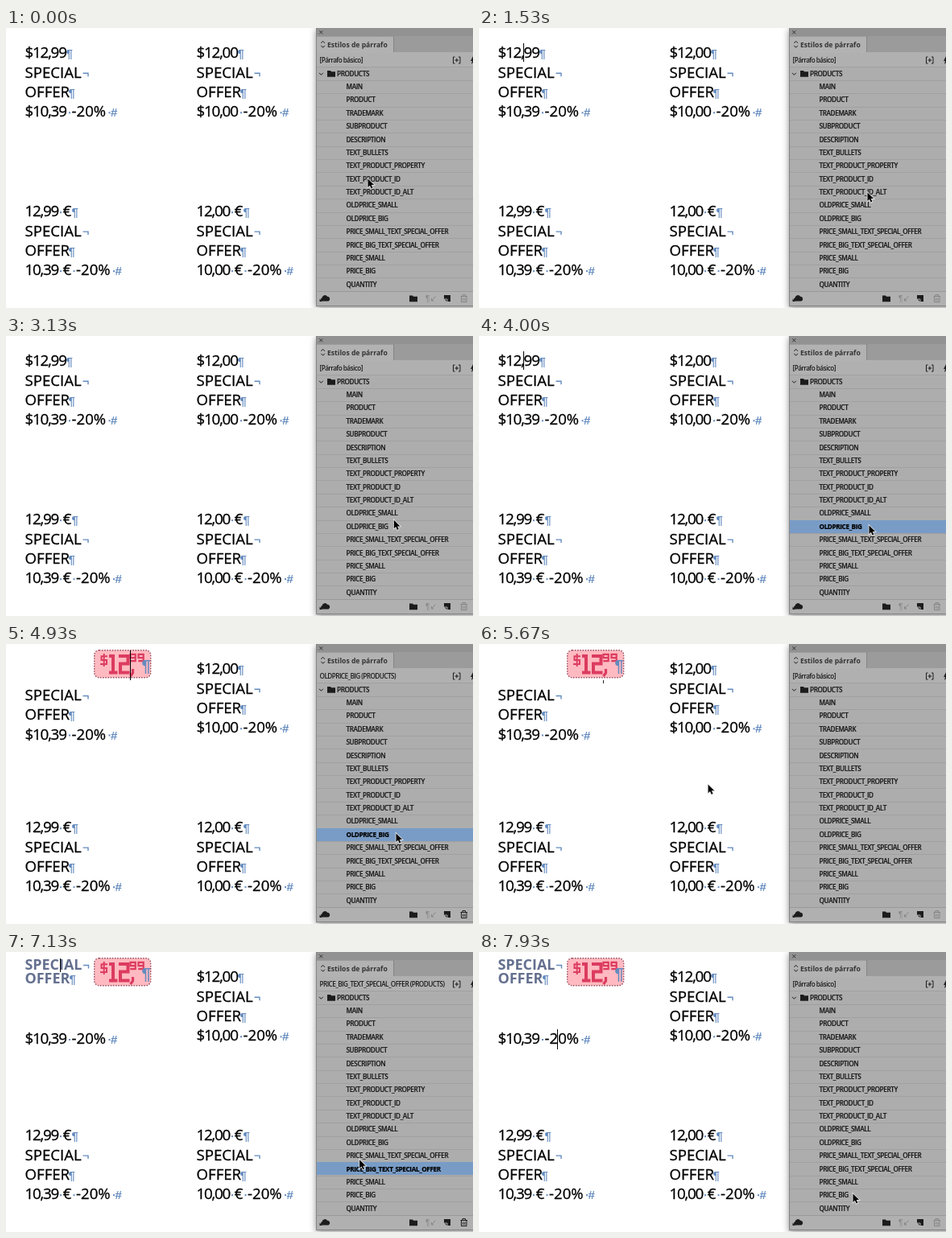
Write an HTML page with a canvas that moves like this. It is 580 px wide and 348 px high and loops after 8 s.

```html
<!DOCTYPE html>
<html lang="es">
<head>
<meta charset="utf-8">
<title>Estilos de párrafo</title>
<style>
html, body { margin: 0; width: 100%; height: 100%; overflow: hidden; background: #fff; }
canvas { display: block; }
</style>
</head>
<body>
<canvas id="stage" width="580" height="348"></canvas>
<script>
const ctx = document.getElementById('stage').getContext('2d');
const LOOP = 8000;
const SANS = '"Open Sans", "Noto Sans", sans-serif';
const MARK_FONT = '"Liberation Sans", Arial, sans-serif';
const MARK = '#648bbf', RED = '#dc3c60', INK = '#1c1c1c', DIM = '#858585';
const STYLES = ['MAIN', 'PRODUCT', 'TRADEMARK', 'SUBPRODUCT', 'DESCRIPTION', 'TEXT_BULLETS',
  'TEXT_PRODUCT_PROPERTY', 'TEXT_PRODUCT_ID', 'TEXT_PRODUCT_ID_ALT', 'OLDPRICE_SMALL',
  'OLDPRICE_BIG', 'PRICE_SMALL_TEXT_SPECIAL_OFFER', 'PRICE_BIG_TEXT_SPECIAL_OFFER',
  'PRICE_SMALL', 'PRICE_BIG', 'QUANTITY'];
const ROW_TOP = 64.8, ROW_H = 16.37;

// Times of the user's actions
const PRICE = { press: 3900, panel: 4080, apply: 4100, leave: 5350 };
const OFFER = { press: 6720, panel: 6860, apply: 7030, leave: 7700 };
const CLICK_OFFER = 5270, CLICK_LAST = 7450;

const POINTER = [ // time, x, y
  [0, 449, 187], [350, 449, 187], [1100, 478, 202], [1530, 482, 204], [2270, 478, 220],
  [2900, 480, 225], [3500, 484, 235], [4950, 484, 235], [5200, 67, 66], [5350, 67, 66],
  [5950, 460, 262], [6270, 467, 273], [7080, 467, 270], [7380, 98, 110], [7500, 98, 110],
  [7840, 458, 294], [7930, 464, 300], [8000, 464, 300]];

const within = (t, a, b) => t >= a && t < b;

// "bolder" outlines the glyphs slightly for weights between the installed ones
function text(str, x, y, size, { weight = 400, color = '#000', spacing = 0, family = SANS, bolder = 0 } = {}) {
  ctx.font = `${weight} ${size}px ${family}`;
  ctx.letterSpacing = spacing + 'px';
  ctx.fillStyle = color;
  ctx.fillText(str, x, y);
  if (!bolder) return;
  ctx.strokeStyle = color;
  ctx.lineWidth = bolder;
  ctx.lineJoin = 'round';
  ctx.strokeText(str, x, y);
  ctx.lineJoin = 'miter';
}

function box(x, y, w, h, color) {
  ctx.fillStyle = color;
  ctx.fillRect(x, y, w, h);
}

function stroke(d, color, width = 1) {
  ctx.strokeStyle = color;
  ctx.lineWidth = width;
  ctx.stroke(new Path2D(d));
}

function shape(d, color) {
  ctx.fillStyle = color;
  ctx.fill(new Path2D(d));
}

const word = (str, x, y) => text(str, x - .4, y, 18.6, { bolder: .3 });
const digits = (str, x, y) => text(str, x - .6, y, 18.8, { spacing: -1.15, bolder: .3 });
const mark = (str, x, y, size = 15) => text(str, x, y, size, { weight: 700, color: MARK, family: MARK_FONT });
const dot = (x, y) => box(x - 1, y - 6, 2, 2, MARK);
const lineBreak = (x, y) => stroke(`M${x} ${y - 5.5}h6.5v4`, MARK, 1.4);

function specialOffer(x, y1, y2) {
  word('SPECIAL', x, y1);
  lineBreak(x + 71.5, y1);
  word('OFFER', x, y2);
  mark('¶', x + 53.5, y2);
}

function discount(price, x, y, euro) {
  const shift = euro ? 5.5 : 0;
  digits(price, x, y);
  if (euro) {
    dot(x + 44, y);
    word('€', x + 47, y);
  }
  dot(x + 55 + shift, y);
  word('-20%', x + 58 + shift, y);
  dot(x + 104.5 + shift, y);
  mark('#', x + 106 + shift, y);
}

function priceLine(price, x, y, euro) {
  digits(price, x, y);
  if (euro) {
    dot(x + 44, y);
    word('€', x + 47, y);
  }
  mark('¶', x + (euro ? 57.5 : 50.5), y);
}

function product(x, y, price, reduced, euro) {
  priceLine(price, x, y, euro);
  specialOffer(x, y + 24.4, y + 48.6);
  discount(reduced, x, y + 73, euro);
}

function priceTag() {
  ctx.beginPath();
  ctx.roundRect(109.7, 7.7, 70, 34, 6);
  ctx.fillStyle = '#ffbac1';
  ctx.fill();
  ctx.strokeStyle = '#9c5062';
  ctx.lineWidth = 1.4;
  ctx.setLineDash([1.6, 1.6]);
  ctx.stroke();
  ctx.setLineDash([]);
  // Square-cut numerals: $ 1 2 , 99
  stroke('M126 15.2h-7.5v4.8h6.5v5h-8M121.7 12v16', RED, 2);
  stroke('M128 15h5v21M128 35.5h10.5', RED, 4);
  stroke('M140 15h11.5v9.5h-9.5v11h11.5', RED, 4);
  stroke('M157.5 31v5l-3 4', RED, 3.2);
  const nine = x => stroke(`M${x + 7} 17.2h-6v-4.4h6.2v8.4h-6.4`, RED, 2.2);
  nine(153.5);
  nine(163.5);
  mark('¶', 168.5, 34, 20);
}

function drawDocument(t) {
  const priced = t >= PRICE.apply, offered = t >= OFFER.apply;
  product(237, 37.3, '$12,00', '$10,00', false);
  product(24, 234.2, '12,99', '10,39', true);
  product(237, 234.2, '12,00', '10,00', true);
  if (!priced) return product(24, 37.3, '$12,99', '$10,39', false);

  priceTag();
  if (offered) {
    const slate = { weight: 700, color: '#64708f' };
    text('SPECIAL', 23.5, 22.3, 17.9, slate);
    lineBreak(96, 22);
    text('OFFER', 23.5, 39.3, 17.9, slate);
    mark('¶', 78.5, 39);
  } else {
    specialOffer(24, 70, 94.2);
  }
  discount('$10,39', 24, offered ? 114 : 118.5, false);
  if (within(t, CLICK_OFFER, OFFER.apply)) box(154, 45, 1, 4, '#222');
}

function drawCaret(t) {
  if (!within(t % 1060, 400, 930)) return;
  const [x, top, bottom] =
    t < PRICE.apply ? [55, 19, 42] :
    t < CLICK_OFFER ? [154, 8, 45] :
    t < OFFER.apply ? [67, 54, 76] :
    t < CLICK_LAST ? [67, 8, 25] : [97, 96, 121];
  box(x, top, 1, bottom - top, '#000');
}

function folder(x, y) {
  shape(`M${x} ${y}h4l1 1.3h5v6.5h-10z`, INK);
}

function drawPanel(t) {
  const pressed = within(t, PRICE.press, PRICE.leave) ? 10 : within(t, OFFER.press, OFFER.leave) ? 12 : -1;
  const active = within(t, PRICE.panel, PRICE.leave) || within(t, OFFER.panel, OFFER.leave);

  ctx.save();
  ctx.shadowColor = 'rgba(0,0,0,.45)';
  ctx.shadowBlur = 8;
  ctx.shadowOffsetY = 2;
  box(385, 0, 205, 346, '#b0b0b0');
  ctx.restore();
  box(385, 0, 195, 10, '#929292');
  box(385, 10, 195, 20, '#9b9b9b');
  box(386, 11, 95, 20, '#b2b2b2');
  box(481, 10, 1, 20, '#858585');
  box(386, 48, 194, 279, '#adadad');
  box(385, 0, 1, 346, '#858585');
  box(385, 345, 195, 1, '#808080');

  stroke('M389.3 3.3l4 4M393.3 3.3l-4 4', '#333');
  stroke('M391.3 18.8l2.3-2.5 2.3 2.5M391.3 21.8l2.3 2.5 2.3-2.5', INK);
  text('Estilos de párrafo', 399, 23.5, 8.6, { weight: 700, color: '#333' });

  ctx.save();
  ctx.beginPath();
  ctx.rect(386, 32, 165, 16);
  ctx.clip();
  text(active ? STYLES[pressed] + ' (PRODUCTS)' : '[Párrafo básico]', 389.5, 43, 8.2,
    { weight: 600, color: INK, spacing: -.55 });
  ctx.restore();

  stroke('M557.5 36h-2v8h2M562 36h2v8h-2M557.5 40h4.6M559.8 37.7v4.6', INK);
  shape('M580 35l-3 6h2l-1 4 2-2z', INK);

  const label = { weight: 600, color: INK, spacing: -.39, bolder: .2 };
  stroke('M389 55.8l2.4 2.5 2.4-2.5', INK);
  folder(399, 53);
  text('PRODUCTS', 411, 60, 8.2, label);
  box(386, 48, 194, 1, '#a0a0a0');
  STYLES.forEach((name, i) => {
    const y = ROW_TOP + i * ROW_H;
    const selected = i === pressed;
    if (selected) box(386, Math.round(y), 194, 16, '#789cc6');
    else box(386, Math.round(y), 194, 1, '#a0a0a0');
    text(name, 422.5, y + 11.3, 8.2, selected ? { ...label, weight: 700, color: '#000' } : label);
  });
  box(386, 327, 194, 1, '#999');

  // Footer icons
  shape('M393 339.5a2.2 2.2 0 0 1-.5-4.3a3.6 3.6 0 0 1 6.6-1.4a3 3 0 0 1 1.4 5.7z', INK);
  shape('M389.5 340v-3.5l3.5 3.5z', INK);
  folder(501, 332.5);
  text('¶', 521, 340, 10, { color: DIM, family: MARK_FONT });
  stroke('M528.5 339l5-5.5M528.5 336v3h2.5', DIM);
  shape('M544 332h8v8h-4.5l-3.5-3.5z', INK);
  stroke('M544 337h4v4', '#b0b0b0');
  stroke('M564.5 333.5h8.5M567 333v-1.5h3.5v1.5M565.5 334v6.5h6.5v-6.5M567.7 335.5v3.5M569.9 335.5v3.5',
    active ? INK : DIM);
}

function drawPointer(t) {
  const i = Math.max(1, POINTER.findIndex(p => p[0] > t));
  const [t0, x0, y0] = POINTER[i - 1], [t1, x1, y1] = POINTER[i];
  const u = (t - t0) / (t1 - t0), ease = u * u * (3 - 2 * u);
  ctx.save();
  ctx.translate(x0 + (x1 - x0) * ease, y0 + (y1 - y0) * ease);
  const arrow = 'M.5 .5v10.5l2.4-2.2 1.7 3.8 1.8-.8-1.7-3.7h3.4z';
  stroke(arrow, '#e8e8e8', 1.6);
  shape(arrow, '#000');
  ctx.restore();
}

function frame(now) {
  const t = now % LOOP;
  box(0, 0, 580, 348, '#fff');
  drawDocument(t);
  drawCaret(t);
  drawPanel(t);
  drawPointer(t);
  requestAnimationFrame(frame);
}
requestAnimationFrame(frame);
</script>
</body>
</html>
```
